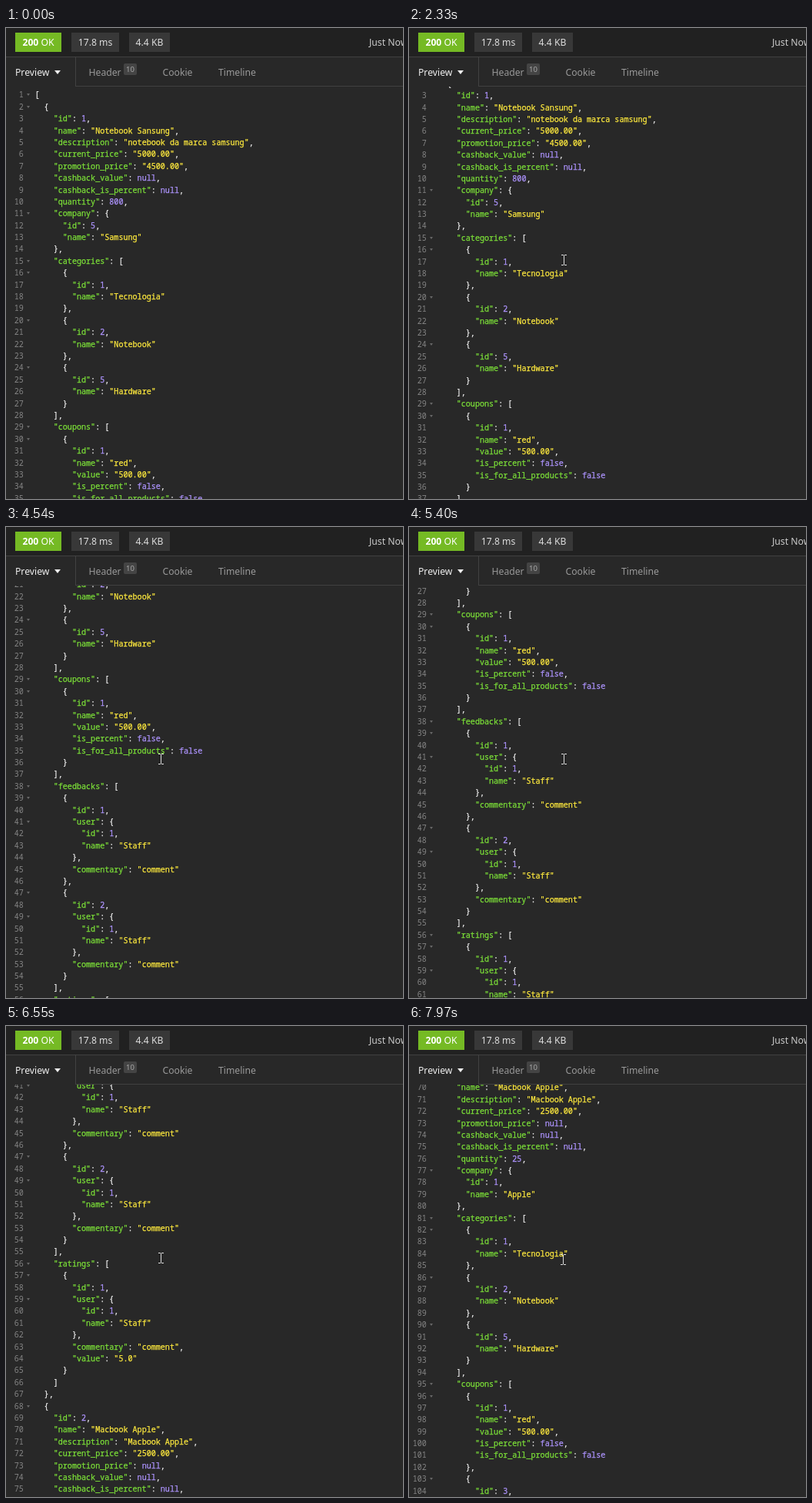
These frames come from a looping animation (516 by 611 pixels, 8 s). An HTML page:

```html
<!DOCTYPE html>
<html lang="en">
<head>
<meta charset="utf-8">
<title>Response preview</title>
<style>
  html, body { margin: 0; width: 100%; height: 100%; overflow: hidden; background: #282828; }
  #stage { position: relative; width: 516px; height: 611px; overflow: hidden; background: #282828;
    font: 12.2px/18px "Noto Sans", "Open Sans", sans-serif; color: #999; white-space: pre; }
  #stage > * { position: absolute; }
  .bar { left: 0; top: 0; width: 516px; height: 37px; background: #212121; }
  .tag { top: 6px; height: 25px; line-height: 25px; text-align: center; background: #383838; color: #ddd; }
  .ok { background: #75ba24; color: #fff; }
  .tab { top: 49px; }
  .on { color: #eee; }
  .rule { background: #414141; }
  .badge { left: 153px; top: 46px; width: 17px; height: 15px; line-height: 15px;
    font-size: 9.5px; text-align: center; background: #444; color: #aaa; border-radius: 2px; }
  .arrow { left: 63px; top: 55px; border: 4.5px solid transparent; border-top: 5px solid #eee; border-bottom: 0; }
  #editor { left: 0; top: 76px; width: 516px; height: 535px; overflow: hidden;
    font: 10.08px/15.4px "Noto Sans Mono", "DejaVu Sans Mono", monospace; color: #eee;
    -webkit-text-stroke: .25px; }
  #code { position: absolute; left: 0; top: 3.4px; width: 516px; }
  .line { position: relative; height: 15.4px; padding-left: 37.5px; }
  .num { position: absolute; left: 0; width: 22.8px; text-align: right; color: #858585; -webkit-text-stroke: 0; }
  .fold { position: absolute; left: 27px; top: 6px; border: 2.5px solid transparent;
    border-top: 3px solid #686868; border-bottom: 0; }
  .key { color: #7ce038; }
  .str { color: #ffea3e; }
  .val { color: #ae94ff; }
</style>
</head>
<body>
<div id="stage">
  <div class="bar"></div>
  <div class="tag ok" style="left:12px;width:60px"><b>200</b> OK</div>
  <div class="tag" style="left:85px;width:62px">17.8 ms</div>
  <div class="tag" style="left:160px;width:53px">4.4 KB</div>
  <div style="left:472px;top:10px;color:#ccc">Just Now</div>
  <div class="rule" style="left:0;top:37px;width:516px;height:1px"></div>
  <div class="rule" style="left:90px;top:37px;width:1px;height:39px"></div>
  <div class="rule" style="left:90px;top:75px;width:426px;height:1px"></div>
  <div class="tab on" style="left:12px">Preview</div>
  <div class="arrow"></div>
  <div class="tab" style="left:107.5px">Header</div>
  <div class="badge">10</div>
  <div class="tab" style="left:203.5px">Cookie</div>
  <div class="tab" style="left:276px">Timeline</div>
  <div id="editor"><div id="code"></div></div>
  <svg id="cursor" width="9" height="16" style="left:0;top:0">
    <path d="M1 1.5H4M5 1.5H8M4.5 2V14M1 14.5H4M5 14.5H8" fill="none" stroke="#ddd"/>
  </svg>
</div>
<script>
const named = (id, name) => ({ id, name });
const user = named(1, "Staff");
const note = id => ({ id, user, commentary: "comment" });
const coupon = id => ({ ...named(id, "red"), value: "500.00", is_percent: false, is_for_all_products: false });
const product = (id, name, description, current_price, promotion_price, quantity, company, coupons) => ({
  id, name, description, current_price, promotion_price,
  cashback_value: null, cashback_is_percent: null, quantity, company,
  categories: [named(1, "Tecnologia"), named(2, "Notebook"), named(5, "Hardware")],
  coupons,
  feedbacks: [note(1), note(2)],
  ratings: [{ ...note(1), value: "5.0" }]
});
const data = [
  product(1, "Notebook Sansung", "notebook da marca samsung", "5000.00", "4500.00", 800,
    named(5, "Samsung"), [coupon(1)]),
  product(2, "Macbook Apple", "Macbook Apple", "2500.00", null, 25,
    named(1, "Apple"), [coupon(1), coupon(3)])
];

const paint = text => text.replace(/("[^"]*")(:?)|null|false|\d+/g, (all, quoted, colon) =>
  quoted ? `<span class="${colon ? "key" : "str"}">${quoted}</span>${colon}`
         : `<span class="val">${all}</span>`);

const code = document.getElementById("code");
const cursor = document.getElementById("cursor");
code.innerHTML = JSON.stringify(data, null, 2).split("\n").map((text, i) =>
  `<div class="line"><span class="num">${i + 1}</span>` +
  (/[[{]$/.test(text) ? '<i class="fold"></i>' : "") + paint(text) + "</div>").join("");

// Wheel turns: start, end, scroll offset after each step
const turns = [
  [2330, 2670, [30, 84, 112, 165, 194, 200]],
  [3000, 3130, [235, 285, 300]],
  [4540, 4740, [320, 368, 395, 400]],
  [5400, 5610, [404, 452, 490, 500]],
  [5940, 6150, [520, 568, 595, 600]],
  [6550, 7160, [625, 678, 712, 755, 798, 835, 872, 895, 900]],
  [7620, 7970, [910, 950, 988, 1008, 1038, 1069]]
];

// Number of steps taken so far, 0 before the start
const steps = (t, start, end, n) =>
  t < start ? 0 : Math.min(n, 1 + Math.floor((t - start + .5) / (end - start) * (n - 1)));

function draw(t) {
  let scroll = 0;
  for (const [start, end, offsets] of turns) {
    const n = steps(t, start, end, offsets.length);
    if (n) scroll = offsets[n - 1];
  }
  code.style.transform = `translateY(${-scroll}px)`;

  const entry = steps(t, 120, 880, 12);
  const rest = 1 - (entry - 1) / 11;
  const lift = steps(t, 940, 1140, 4) / 4;
  const drift = steps(t, 7620, 7970, 6) / 6;
  const x = Math.round(197 + 262 * rest ** 2 - drift);
  const y = Math.round(303 + 288 * rest ** 2 - 10 * lift + 2 * drift);
  cursor.style.visibility = entry ? "visible" : "hidden";
  cursor.style.transform = `translate(${x}px, ${y}px)`;
}

const begin = performance.now();
function tick() {
  draw((performance.now() - begin) % 8000);
  requestAnimationFrame(tick);
}
tick();
</script>
</body>
</html>
```
